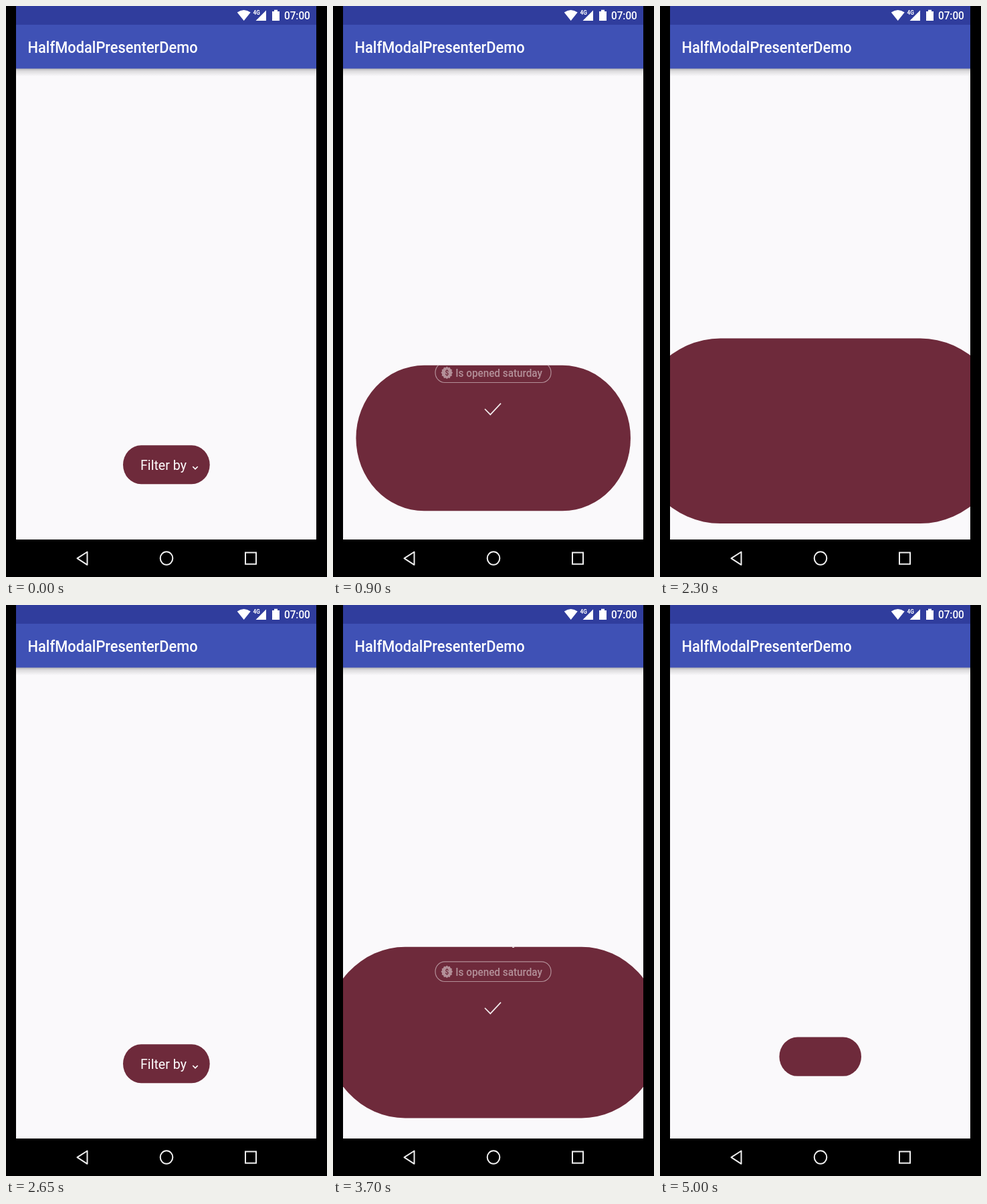
An HTML page for the animation above (5050 ms loop, 480 by 853 pixels).

```html
<!DOCTYPE html>
<html lang="en">
<head>
<meta charset="utf-8">
<title>Half modal demo</title>
<style>
  html, body { margin: 0; width: 100%; height: 100%; overflow: hidden; background: #000; }
  svg { display: block; width: 480px; height: 853px; }
  text { font-family: Roboto, "Noto Sans", sans-serif; fill: #fff; }
  .line { fill: none; stroke: #fff; }
</style>
</head>
<body>
<svg viewBox="0 0 480 853">
  <defs>
    <linearGradient id="shade" x2="0" y2="1">
      <stop stop-color="#000" stop-opacity=".3"/>
      <stop offset=".35" stop-color="#000" stop-opacity=".12"/>
      <stop offset="1" stop-color="#000" stop-opacity="0"/>
    </linearGradient>
    <clipPath id="reveal"><rect id="hole"/></clipPath>
  </defs>

  <rect width="480" height="853"/>
  <rect x="15" y="93" width="449" height="704" fill="#faf9fb"/>
  <rect x="15" y="93" width="449" height="12" fill="url(#shade)"/>
  <rect x="15" width="449" height="28" fill="#303d9d"/>
  <rect x="15" y="28" width="449" height="65.5" fill="#3f51b5"/>

  <!-- status bar -->
  <g fill="#fff">
    <path d="M345.7 9.6Q355.7 2.4 365.7 9.6L355.7 22Z"/>
    <path d="M389 6.5V22H373.5Z"/>
    <path d="M398 8H401V5.8H406V8H409V22H398Z"/>
  </g>
  <g id="labels"></g>

  <!-- navigation bar -->
  <g class="line" stroke-width="2" style="stroke:#f0f0f0">
    <path d="M121.5 815.5V834.8L106.5 825.2Z" stroke-linejoin="round"/>
    <ellipse cx="240" cy="825" rx="9.3" ry="9.8"/>
    <rect x="358" y="816.5" width="16" height="17.2"/>
  </g>

  <g id="button">
    <rect x="175" y="656.3" width="129.7" height="58" rx="27.1" ry="29" fill="#6e2a3b"/>
    <path class="line" d="M279.3 688L283 691.8L286.7 688" stroke-width="1.7"/>
  </g>

  <g id="modal" clip-path="url(#reveal)">
    <rect x="15" y="445" width="449" height="352" fill="#6e2a3b"/>
    <g id="content">
      <path class="line" d="M227 602L235.3 610.4L251 593.6" stroke-width="1.7" opacity=".9"/>
      <g id="chip" opacity=".48">
        <rect class="line" x="153" y="532.8" width="173" height="29.7" rx="14" ry="14.8" stroke-width="1.2"/>
        <path id="badge" fill="#fff"/>
      </g>
    </g>
  </g>
</svg>
<script>
const $ = id => document.getElementById(id);
const LOOP = 5050, STEP = 50, MOVE = 260;

// screen density: one dp in stage pixels
const DX = 1.0914, DY = 1.1663;

function addText(parent, str, x, y, size, weight = 400, fill = '#fff') {
  const el = document.createElementNS('http://www.w3.org/2000/svg', 'text');
  el.textContent = str;
  el.setAttribute('transform', `translate(${x} ${y}) scale(${DX} ${DY})`);
  el.setAttribute('font-size', size);
  el.setAttribute('font-weight', weight);
  el.style.fill = fill;
  parent.append(el);
}

addText($('labels'), 'HalfModalPresenterDemo', 32.5, 69.9, 20, 500);
addText($('labels'), '07:00', 416, 20.4, 14, 500);
addText($('labels'), '4G', 369.5, 13.2, 7.5, 700);
addText($('button'), 'Filter by', 201, 693.4, 18);
addText($('content'), 'Filter by', 201, 507, 20);
addText($('chip'), 'Is opened saturday', 183.2, 554.3, 14, 500);

// scalloped badge with a dollar sign
let outline = '';
for (let i = 0; i < 24; i++) {
  const a = i * Math.PI / 12, r = i % 2 ? 7.4 : 8.8;
  outline += (i ? 'L' : 'M') + (170.3 + r * Math.cos(a)).toFixed(2) + ' ' + (547.8 + r * 1.06 * Math.sin(a)).toFixed(2);
}
$('badge').setAttribute('d', outline + 'Z');
addText($('content'), '$', 167.6, 551.6, 9, 700, '#6e2a3b');

const cycles = [
  { hide: 722, open: 763, fade: 2095, close: 2212, show: 2550 },
  { hide: 3500, open: 3541, fade: 4630, close: 4742, show: 5050 }
];

const clamp = v => Math.min(1, Math.max(0, v));
const ease = v => (1 - Math.cos(Math.PI * clamp(v))) / 2;
const mix = (a, b, v) => a + (b - a) * v;

// pill that grows until its straight part spans the screen
function setHole(p) {
  const h = mix(58.3, 352, p), ry = h / 2, rx = ry * DX / DY;
  const w = 2 * rx + mix(68, 449, .285 * p + .715 * p * p);
  const box = { x: 239.7 - w / 2, y: mix(674.7, 621, p) - ry, width: w, height: h, rx, ry };
  for (const k in box) $('hole').setAttribute(k, box[k].toFixed(2));
}

function draw(t) {
  const c = cycles.find(c => t >= c.hide && t < c.show);
  $('button').style.display = c ? 'none' : '';
  $('modal').style.display = c ? '' : 'none';
  if (!c) return;
  setHole(ease((t - c.open) / MOVE) - ease((t - c.close) / MOVE));
  $('content').style.opacity = 1 - clamp((t - c.fade) / 100);
}

const start = performance.now();
function tick() {
  const t = (performance.now() - start) % LOOP;
  draw(Math.floor(t / STEP) * STEP);
  requestAnimationFrame(tick);
}
tick();
</script>
</body>
</html>
```
